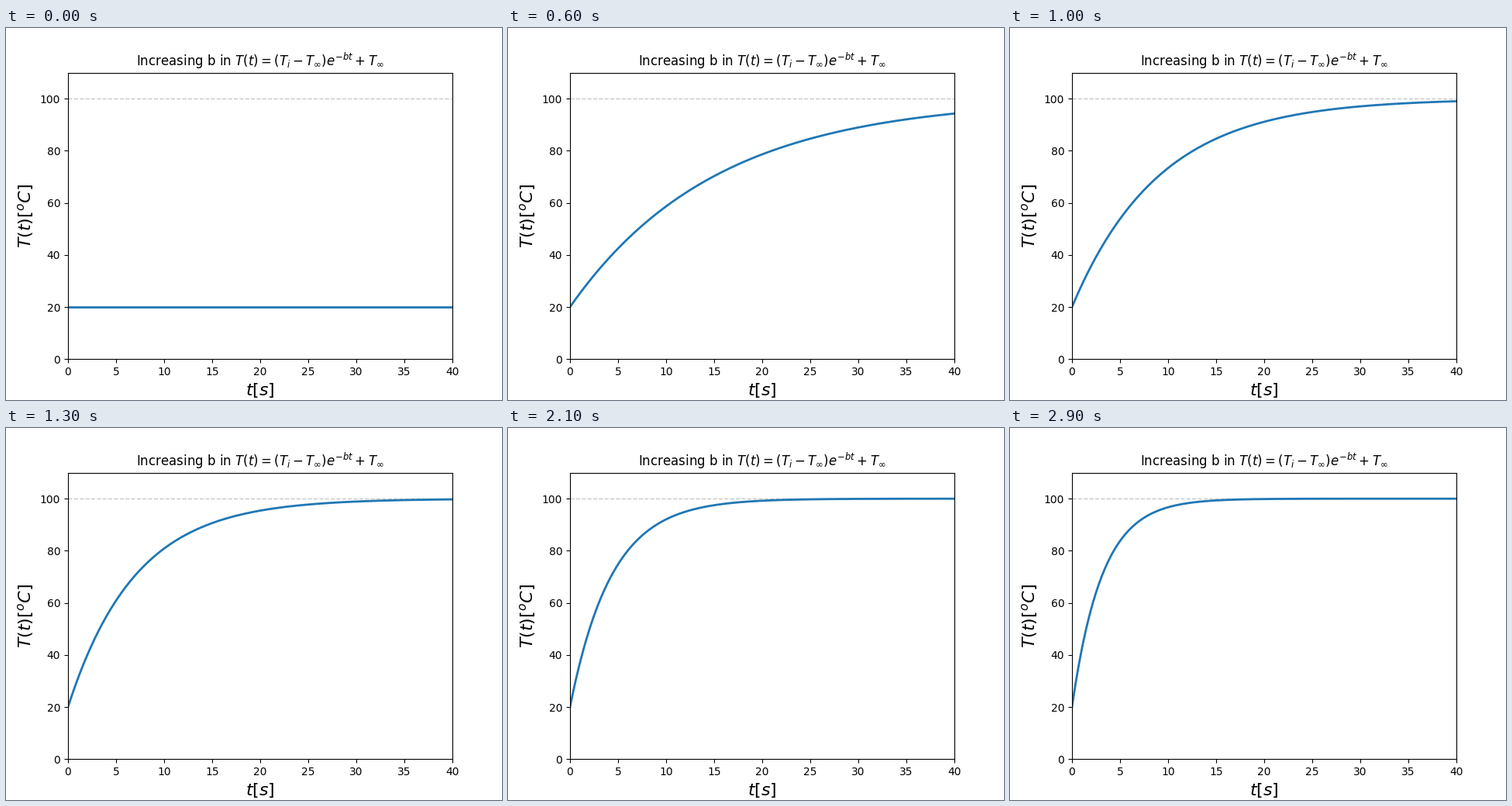
Animation, 640 px wide and 480 px high, one loop 3 s. Source, as a matplotlib script:

```python
import numpy as np
import matplotlib.pyplot as plt
from matplotlib.animation import FuncAnimation

FRAMES = 30
INTERVAL = 100
T_START, T_END = 20, 100
B_STEP = 0.011

plt.rcParams["font.family"] = "DejaVu Sans"

fig, ax = plt.subplots(figsize=(6.4, 4.8), dpi=100)
t = np.linspace(0, 40, 401)


def temperature(b):
    return (T_START - T_END) * np.exp(-b * t) + T_END


ax.set_xlim(0, 40)
ax.set_ylim(0, 110)
ax.set_title(r"Increasing b in $T(t) = (T_i - T_\infty)e^{-bt} + T_\infty$")
ax.set_xlabel(r"$t [s]$", fontsize=16)
ax.set_ylabel(r"$T(t) [^oC]$", fontsize=16)

ax.plot([0, 40], [T_END, T_END], "--", color="0.78", lw=1)
curve, = ax.plot(t, temperature(0), color="tab:blue", lw=2)


def update(i):
    curve.set_ydata(temperature(B_STEP * i))
    return curve,


anim = FuncAnimation(fig, update, frames=FRAMES, interval=INTERVAL,
                     repeat=True, repeat_delay=0)
plt.show()
```
